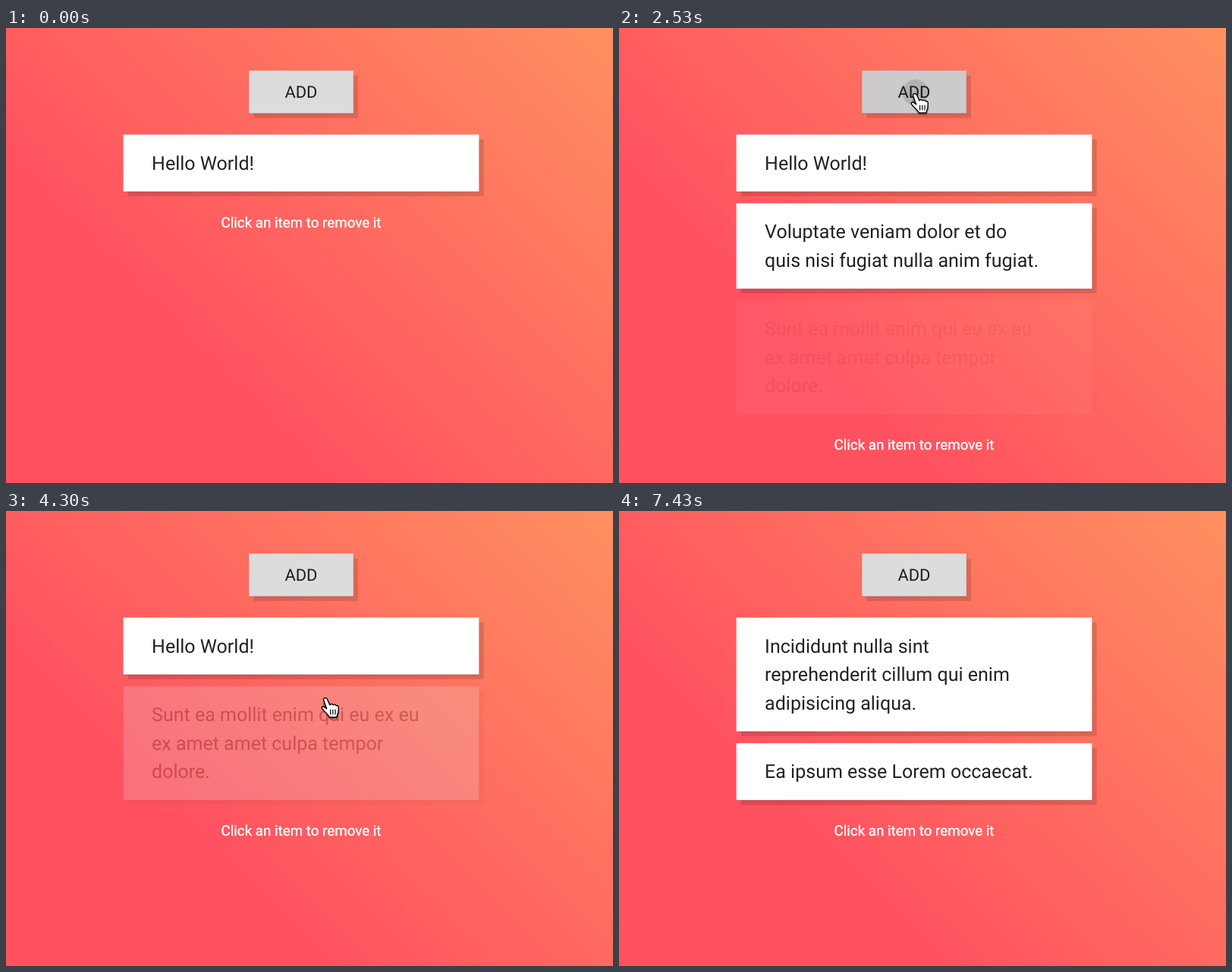
Animation of 800x600 px, one loop 7.46 s. Source, as an HTML page:

```html
<!DOCTYPE html>
<html lang="en">
<head>
<meta charset="utf-8">
<title>List with fading items</title>
<style>
  html, body { margin: 0; width: 100%; height: 100%; overflow: hidden; }
  body { background: linear-gradient(45deg, #ff5160 30%, #ff9060); }
  svg { display: block; width: 800px; height: 600px; }
  text {
    font: 25px Roboto, Arial, sans-serif;
    fill: rgba(0, 0, 0, .87);
    text-rendering: geometricPrecision;
  }
  #add text { font-size: 21.875px; text-anchor: middle; }
  #hint {
    font-size: 18.75px; text-anchor: middle;
    fill: #fff; stroke: #fff; stroke-width: .35px;
  }
  .shade { fill: rgba(0, 0, 0, .13); }
  .edge { fill: rgba(0, 0, 0, .16); }
</style>
</head>
<body>
<svg viewBox="0 0 800 600">
  <clipPath id="face"><rect x="320.3" y="56.25" width="137.5" height="56.25"/></clipPath>
  <g id="add">
    <rect class="shade" x="326.5" y="62.5" width="137.5" height="56.25"/>
    <rect class="edge" x="320.3" y="57.25" width="137.5" height="56.25"/>
    <rect id="button" x="320.3" y="56.25" width="137.5" height="56.25"/>
    <circle id="ripple" cx="390.5" cy="85" clip-path="url(#face)"/>
    <text x="389" y="92.3">ADD</text>
  </g>
  <g id="list"></g>
  <text id="hint" x="389">Click an item to remove it</text>
  <g id="hand" stroke="#000" stroke-linejoin="round" stroke-linecap="round">
    <path fill="rgba(0,0,0,.25)" stroke="none" transform="translate(.5 2)"
      d="M-2 2C-2-1 2-2 4 1L7 9 18 10 19 18 16 26H6L-4 13Z"/>
    <path fill="#fff" stroke-width="1.4"
      d="M-1.5 2C-2-.5 2-1.5 3.3 1L6.8 8.8C8 7 10.5 7.2 11.4 8.8
         C12.6 7.6 14.6 8 15.2 9.8C16.8 9 18.3 10 18.3 12L18 17.5
         C17.8 20.5 16 21.8 16 25H6.2C5.6 22 0 18-3.2 13.8
         C-5 11-2 9.8.2 12L2.6 13.8Z"/>
    <path fill="none" stroke-width="1.2" d="M7.6 15v6M10.8 15v6M14 15v6"/>
  </g>
</svg>
<script>
const LOOP = 7460, FADE = 500, RIPPLE = 550;
const LEFT = 154.6, TOP = 140.6, WIDTH = 468.75, LINE = 37.5, GAP = 15.625, DROP = 6.25;

const items = [
  { lines: ['Hello World!'], enter: -1000, leave: 4700 },
  { lines: ['Voluptate veniam dolor et do', 'quis nisi fugiat nulla anim fugiat.'], enter: 1740, leave: 3230 },
  { lines: ['Sunt ea mollit enim qui eu ex eu', 'ex amet amet culpa tempor', 'dolore.'], enter: 2470, leave: 3865 },
  { lines: ['Incididunt nulla sint', 'reprehenderit cillum qui enim', 'adipisicing aliqua.'], enter: 5425, leave: 1e5 },
  { lines: ['Ea ipsum esse Lorem occaecat.'], enter: 6060, leave: 1e5 }
];

const presses = [1680, 2410, 5365, 6000];
const buttonHover = [[1400, 3020], [5310, 6330]];

// time, x, y of the fingertip
const path = [
  [1150, 400, -40], [1480, 389, 87], [2950, 389, 87], [3150, 418, 272],
  [3740, 418, 272], [3840, 420, 247], [4380, 420, 247], [4620, 415, 182],
  [5210, 415, 182], [5370, 384, 84], [5480, 378, 71], [6230, 378, 71],
  [6480, 372, -40]
];

const $ = id => document.getElementById(id);
const clamp = v => Math.min(1, Math.max(0, v));
const smooth = p => p * p * (3 - 2 * p);
const easeIn = p => clamp(p) ** 1.7;

function add(parent, tag, attrs) {
  const el = document.createElementNS('http://www.w3.org/2000/svg', tag);
  for (const key in attrs) el.setAttribute(key, attrs[key]);
  return parent.appendChild(el);
}

for (const item of items) {
  item.height = LINE * (item.lines.length + 1);
  const size = { width: WIDTH, height: item.height };
  item.group = add($('list'), 'g', {});
  add(item.group, 'rect', { ...size, x: DROP, y: DROP, class: 'shade' });
  add(item.group, 'rect', { ...size, y: 1, class: 'edge' });
  item.card = add(item.group, 'rect', size);
  item.lines.forEach((line, i) => {
    add(item.group, 'text', { x: 37.5, y: 46 + i * LINE }).textContent = line;
  });
}

function fingertip(t) {
  if (t <= path[0][0]) return path[0].slice(1);
  for (let i = 1; i < path.length; i++) {
    const [t0, x0, y0] = path[i - 1], [t1, x1, y1] = path[i];
    if (t < t1) {
      const p = smooth((t - t0) / (t1 - t0));
      return [x0 + (x1 - x0) * p, y0 + (y1 - y0) * p];
    }
  }
  return path[path.length - 1].slice(1);
}

function opacity(item, t) {
  return t < item.leave
    ? .01 + .99 * easeIn((t - item.enter) / FADE)
    : 1 - .99 * easeIn((t - item.leave) / FADE);
}

function drawList(t, x, y) {
  let top = TOP, hint = 0;
  const shown = items.filter(it => t >= it.enter && t < it.leave + FADE);
  for (const item of items) {
    item.group.setAttribute('display', shown.includes(item) ? 'inline' : 'none');
  }
  for (const item of shown) {
    const over = x > LEFT && x < LEFT + WIDTH && y > top && y < top + item.height;
    item.group.setAttribute('transform', `translate(${LEFT} ${top})`);
    item.group.setAttribute('opacity', opacity(item, t));
    item.card.setAttribute('fill', over ? '#e5e5e5' : '#fff');
    hint = Math.max(hint, opacity(item, t));
    top += item.height + GAP;
  }
  // the hint only fades together with the sole item of the list
  if (shown.length > 1 || t < 4700) hint = 1;
  $('hint').setAttribute('opacity', hint);
  $('hint').setAttribute('y', top - GAP + 47);
}

function drawButton(t) {
  let hover = 0;
  for (const [on, off] of buttonHover) {
    hover = Math.max(hover, Math.min(clamp((t - on) / 100), 1 - clamp((t - off) / 80)));
  }
  const mix = (a, b) => Math.round(a + (b - a) * hover);
  $('button').setAttribute('fill', `rgb(${mix(220, 204)},${mix(220, 202)},${mix(220, 204)})`);

  const start = presses.find(s => t >= s && t < s + RIPPLE);
  const p = start === undefined ? 1 : (t - start) / RIPPLE;
  $('ripple').setAttribute('r', 78 * p);
  $('ripple').setAttribute('opacity', .12 * clamp(2 * (1 - p)));
}

function draw(t) {
  const [x, y] = fingertip(t);
  drawButton(t);
  drawList(t, x, y);
  $('hand').setAttribute('transform', `translate(${x} ${y})`);
}

const begin = performance.now();
function tick() {
  draw((performance.now() - begin) % LOOP);
  requestAnimationFrame(tick);
}
draw(0);
requestAnimationFrame(tick);
</script>
</body>
</html>
```
